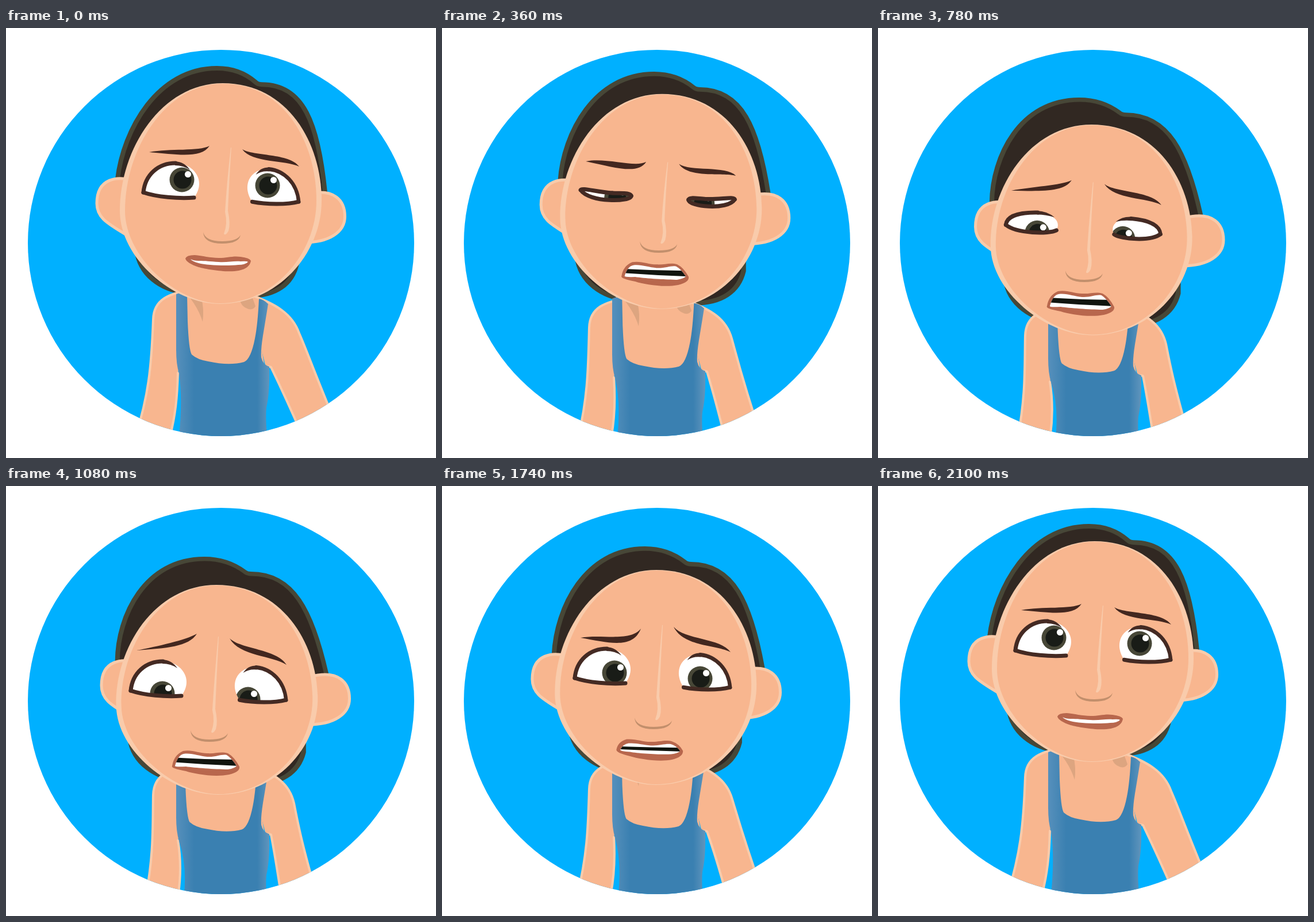
An HTML page with a canvas that plays this animation: 748x748 px, repeating every 2160 ms.

```html
<!DOCTYPE html>
<html lang="en">
<head>
<meta charset="utf-8">
<title>Worried character</title>
<style>
  html, body { margin: 0; height: 100%; overflow: hidden; background: #fff; }
  canvas { display: block; }
</style>
</head>
<body>
<canvas id="stage" width="748" height="748"></canvas>
<script>
const ctx = document.getElementById('stage').getContext('2d');
const SKIN = '#f8b68f', LIGHT = '#f9cbab', SHADE = '#dda580', HAIR = '#312822', OLIVE = '#474737',
      LID = '#442a23', BROW = '#43271f', LIP = '#b8674d', PUPIL = '#191c17';
const LOOP = 2160, STEP = 60;

// Pose offsets at the inner key times; every track rests at 0 at both ends.
const TIMES = [0, 240, 540, 1080, 1500, 1740, 2100];
const TRACKS = {
  hairTopX: [8, -10, -22, -22, -14], hairTopY: [-11, 45, 57, 61, 39],
  hairX: [12, 8, 0, -2, 1],
  backX: [13, 10, 0, -4, 4],         backY: [-6, 43, 53, 55, 36],
  faceTopX: [8, 0, -11, -11, -4],    faceTopY: [-6, 59, 76, 80, 50],
  chinX: [10, 4, -3, -3, 0],         chinY: [-12, 44, 57, 61, 40],
  earX: [13, 13, 8, -4, -1],         earY: [-15, 33, 42, 49, 31],
  x: [7, -10, -22, -17, -8],         y: [-8, 55, 70, 74, 48],
  body: [4, 13, 16.5, 16.5, 11],     arm: [13, 27, 30, 30, 17],
  lookX: [0, -9, -12, 3, 2],         lookY: [10, 22, 27, 25, 13],
  blink: [1, .96, 0, 0, 0],          mouth: [.75, 1, 1, 1, .6],
  browL: [14, 4, -18, -10, -5],      bendL: [15, 4, -17, 7, 9],
  browR: [12, 2, -16, -24, -14],     bendR: [14, 3, -9, -11, -3]
};

function sample(track, time) {
  const v = [0, ...track, 0], t = Math.min(time, 2099.9);
  const i = TIMES.findIndex(k => k > t) - 1;
  const slope = n => n && n < 6 ? (v[n + 1] - v[n - 1]) / (TIMES[n + 1] - TIMES[n - 1]) : 0;
  const h = TIMES[i + 1] - TIMES[i], u = (t - TIMES[i]) / h, w = 1 - u;
  return v[i] * w * w * (1 + 2 * u) + v[i + 1] * u * u * (3 - 2 * u)
       + h * u * w * (w * slope(i) - u * slope(i + 1));
}

const clamp = n => Math.max(0, Math.min(1, n));

// Blend two path strings that share one structure.
function mix(a, b, t) {
  const to = b.match(/\d+/g);
  let i = 0;
  return a.replace(/\d+/g, n => +n + (to[i++] - n) * t);
}

function shape(d, fill, stroke, width) {
  const p = new Path2D(d);
  if (fill) { ctx.fillStyle = fill; ctx.fill(p); }
  if (stroke && width > 0) {
    ctx.strokeStyle = stroke;
    ctx.lineWidth = width;
    ctx.stroke(p);
  }
}

function dot(x, y, r, fill) {
  ctx.fillStyle = fill;
  ctx.beginPath();
  ctx.arc(x, y, r, 0, 7);
  ctx.fill();
}

function group(draw) {
  ctx.save();
  draw();
  ctx.restore();
}

// Move the level y0 by (ax, ay) and the level y1 by (bx, by).
function warp(y0, y1, ax, ay, bx, by) {
  const k = (bx - ax) / (y1 - y0), q = (by - ay) / (y1 - y0);
  ctx.transform(1, 0, k, 1 + q, ax - k * y0, ay - q * y0);
}

function drawHair(p) {
  group(() => {
    ctx.translate(367 + p.backX, p.backY);
    ctx.scale(1 + .005 * p.body, 1);
    ctx.translate(-367, 0);
    shape('M227 385C232 430 270 455 310 460L420 466C470 467 498 445 506 410L506 380Z', HAIR, OLIVE, 8);
  });
  group(() => {
    warp(66, 265, p.hairTopX, p.hairTopY, p.hairX, p.earY + 1);
    shape('M194 262C204 177 263 70 367 70C395 70 418 80 434 94Q438 98 445 98' +
          'C518 98 543 166 555 285L550 340L200 340Z', HAIR, OLIVE, 8);
  });
}

function drawBody(p) {
  const b = p.body, a = p.arm, d = .42 * a, s = 1.85 * b, r = 1.27 * b;
  shape(`M327 ${454 + s}C282 ${462 + s} 257 ${472 + s} 256 ${507 + s}` +
        `C${253 + .15 * d} 590 ${248 + .75 * d} 640 ${224 + 1.5 * d} 715L${284 + 1.2 * d} 715` +
        `C${295 + .8 * d} 675 ${298 + .4 * d} 640 299 ${600 + b}`, SKIN, LIGHT, 4);
  shape(`M420 ${462 + r}C470 ${480 + r} ${498 - .15 * a} ${497 + r} ${510 - .3 * a} ${531 + r}` +
        `C${523 - .55 * a} ${560 + r} ${543 - .95 * a} ${617 + .3 * r} ${585 - 1.45 * a} 715` +
        `L${518 - 1.3 * a} 715Q${489 - .67 * a} 648 461 ${590 + b}Q456 ${588 + b} 452 ${590 + b}`,
        SKIN, LIGHT, 4);
  ctx.translate(0, b);
  shape('M303 443L424 443L430 470L450 590L300 590Z', SKIN);
  shape('M300 446Q332 456 340 470Q345 490 342 511Q333 480 300 446Z', SHADE);
  shape('M407 466L424 458Q430 472 434 484Q430 491 422 489Q407 484 407 470Z', SHADE);
  const cloth = ctx.createLinearGradient(296, 0, 460, 0);
  [[0, '#5590bd'], [.06, '#4e8bb8'], [.19, '#3a80b1'], [.86, '#3a80b1'], [1, '#6497bd']]
    .forEach(stop => cloth.addColorStop(...stop));
  const neck = x => x - .22 * b;
  shape(`M296 463Q306 458 ${neck(315)} 463L${neck(316)} 510Q${neck(318)} 560 ${neck(323)} 568` +
        `Q${neck(333)} 577 ${neck(352)} 580Q${neck(388)} 588 ${neck(414)} 581` +
        `Q${neck(426)} 576 ${neck(433)} 540Q${neck(438)} 515 ${neck(440)} 471` +
        'Q448 472 456 480Q452 505 447 535Q443 560 444 573Q447 586 458 589' +
        `Q459 635 453 660Q451 680 455 720L${300 + .4 * b} 720` +
        `Q${308 + .6 * b} 650 301 601Q296 585 296 560Z`, cloth);
}

function drawHead(p) {
  group(() => {
    ctx.translate(p.earX, p.earY);
    shape('M235 270C190 252 158 264 158 305C158 335 185 343 225 370', SKIN, LIGHT, 5);
    shape('M520 290C573 276 589.5 302 589.5 328C589.5 353 565 375 510 373', SKIN, LIGHT, 5);
  });
  warp(96, 480, p.faceTopX, p.faceTopY, p.chinX, p.chinY);
  shape('M377 96C270 96 198 211 198 318C198 400 290 480 372 480' +
        'C470 480 549 395 549 300C549 200 490 96 377 96Z', LIGHT);
  shape('M377 97C277 97 207 211 207 318C207 397 295 478 372 479' +
        'C465 479 540 393 540 300C540 203 487 97 377 97Z', SKIN);
}

function drawEye(p, irisX, irisY, mirrored) {
  const t = clamp(p.blink), base = ctx.getTransform();
  const upper = mix('M239 286C242 255 265 235 295 235', 'M240 266C241 261 270 270 295 271', t);
  const inner = mix('C325 235 350 265 327 295', 'C310 272 326 270 328 276', t);
  const lower = mix('C300 297 262 294 239 286', 'C328 287 255 288 240 266', t);
  const taper = mix('M294 232Q311 233 320 247Q309 239 294 239Z',
                    'M294 268Q311 268 328 276Q309 274 294 274Z', t);
  group(() => {
    if (mirrored) ctx.transform(-.92, -.1, 0, 1, 729, 40);
    group(() => {
      const white = new Path2D(upper + inner + lower + 'Z');
      ctx.fillStyle = '#fff';
      ctx.fill(white);
      ctx.clip(white);
      ctx.setTransform(base);
      const x = irisX + p.lookX, y = irisY + p.lookY;
      dot(x, y, 21.5, OLIVE);
      dot(x + 1, y, 15.5, PUPIL);
      dot(x + 10.5, y - 9.5, 5.5, '#fff');
    });
    shape(upper, null, LID, 7);
    shape(taper, LID);
    shape(mix('M327 295', 'M328 276', t) + lower, null, LID, 7);
    shape(mix('M295 235', 'M295 271', t) + inner, null, LID, 7 * clamp(t * 3 - 2));
  });
}

function drawMouth(t) {
  shape(mix('M312 401Q314 395 328 395C342 396 355 400 370 400C385 400 395 396 408 398' +
            'Q424 400 426 405Q424 418 405 422C385 426 350 420 335 416Q314 409 312 401Z',
            'M311 417Q314 398 330 391C345 388 358 395 372 395C387 396 395 391 408 395' +
            'Q419 401 428 418Q430 427 410 432C385 437 350 431 335 426Q308 421 311 417Z', t), LIP);
  group(() => {
    const hole = new Path2D(mix(
      'M321 402Q326 405 335 405C347 405 355 406 370 407C385 408 395 405 408 406' +
      'Q419 405 421 407Q416 412 404 412C385 414 350 413 335 409Q324 406 321 402Z',
      'M316 417Q321 398 331 396C345 394 358 400 372 401C387 402 397 396 406 398' +
      'Q414 403 423 417Q420 421 408 423C385 423 350 420 335 418Q316 419 316 417Z', t));
    ctx.fillStyle = '#fff';
    ctx.fill(hole);
    ctx.clip(hole);
    shape(mix('M310 409Q370 409 430 409L430 409Q370 409 310 409Z',
              'M310 402Q370 406 430 406L430 417Q370 415 310 410Z', t), '#11150f');
  });
}

function drawFeatures(p) {
  ctx.translate(p.x, p.y);
  const l = 205 + p.browL, m = 215 + p.bendL, r = 211 + p.browR, n = 223 + p.bendR;
  const k = n / 2 + 106;
  shape(`M391 ${r - 3}Q384 270 381 320Q386 340 379 358Q382 362 387 353` +
        `Q391 340 386 318Q388 270 392 ${r - 3}Z`, LIGHT);
  shape('M343 355Q347 371 376 371Q402 371 408 360Q405 375 376 375Q344 375 343 355Z', '#c28f6c');
  drawEye(p, 306, 264, false);
  drawEye(p, 455, 274, true);
  shape(`M249 216C285 209 335 ${m} 354 ${l}C340 ${m + 12} 300 ${m / 2 + 113} 249 216Z`, BROW);
  shape(`M411 ${r}C430 ${n} 493 ${k} 510 241C486 ${k + 12} 428 ${n + 12} 411 ${r}Z`, BROW);
  drawMouth(clamp(p.mouth));
}

const start = performance.now();

function frame() {
  const time = Math.floor((performance.now() - start) / STEP) * STEP % LOOP, pose = {};
  for (const name in TRACKS) pose[name] = sample(TRACKS[name], time);
  ctx.clearRect(0, 0, 748, 748);
  ctx.lineJoin = ctx.lineCap = 'round';
  group(() => {
    ctx.beginPath();
    ctx.arc(374, 374, 336, 0, 7);
    ctx.clip();
    ctx.fillStyle = '#00b0ff';
    ctx.fillRect(0, 0, 748, 748);
    [drawHair, drawBody, drawHead, drawFeatures].forEach(draw => group(() => draw(pose)));
  });
  requestAnimationFrame(frame);
}
frame();
</script>
</body>
</html>
```
